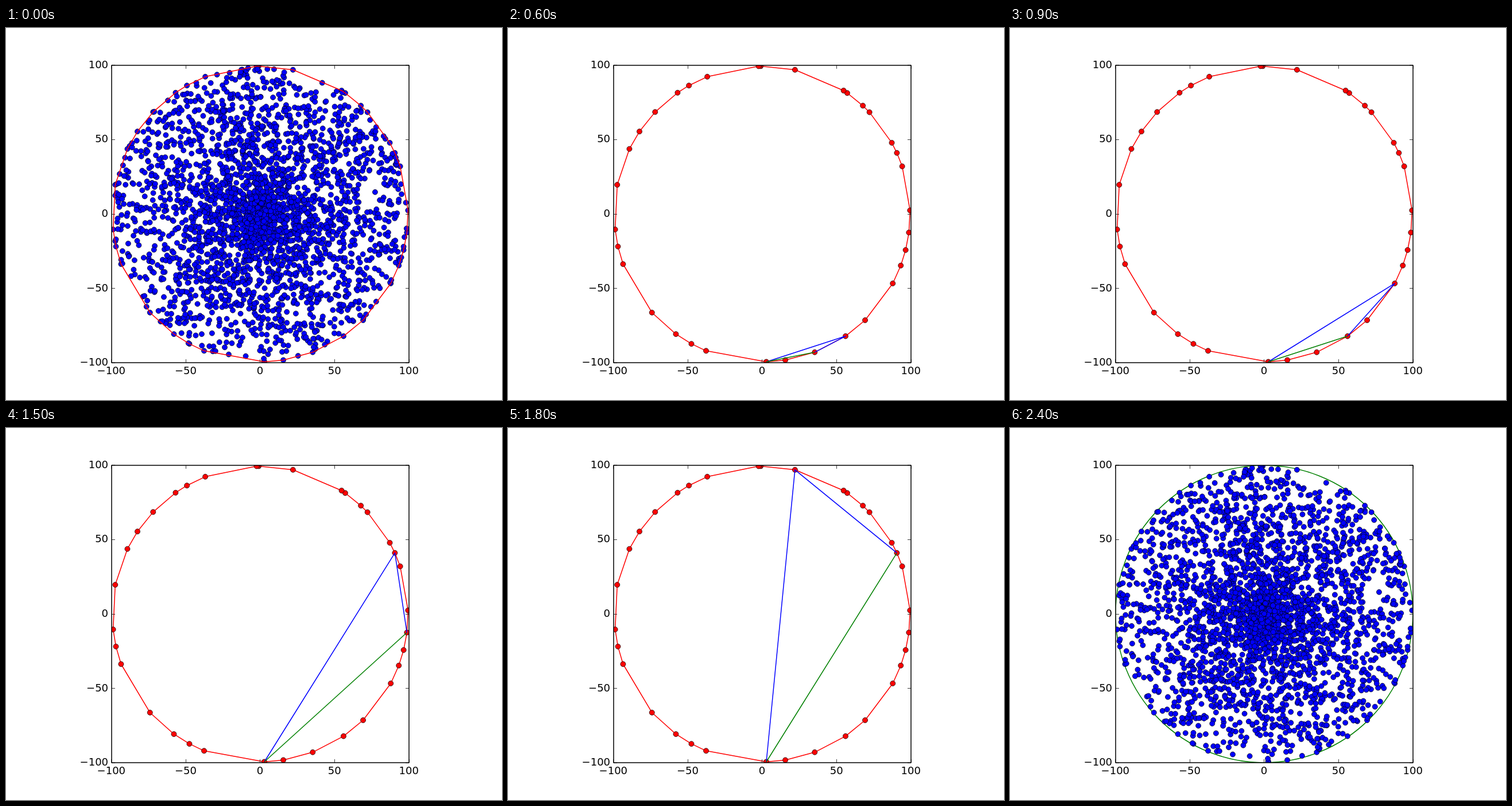
Recreate the animation shown at these times as an HTML page with a canvas. Size 864x648 px, loop 2700 ms.

```html
<!DOCTYPE html>
<html lang="en">
<head>
<meta charset="utf-8">
<title>Convex hull and enclosing circle</title>
<style>
html, body { margin: 0; width: 100%; height: 100%; overflow: hidden; background: #fff; }
canvas { display: block; }
</style>
</head>
<body>
<canvas id="stage" width="864" height="648"></canvas>
<script>
const W = 864, H = 648, STEP = 300, COUNT = 3000;
const CX = 442.8, CY = 324, R = 259.2;
const LEFT = Math.round(CX - R), RIGHT = Math.round(CX + R);
const TOP = Math.round(CY - R), BOTTOM = Math.round(CY + R);
const RED = '#f00', BLUE = '#00f', GREEN = '#008000';
const ctx = document.getElementById('stage').getContext('2d');

const polar = (deg, r) => {
  const a = deg * Math.PI / 180;
  return [CX + r * Math.cos(a), CY - r * Math.sin(a)];
};

// Hull vertices share one radius; directions in degrees, counterclockwise
const hull = [
  -88.4, -81, -69.2, -55.7, -45.9, -28, -20.4, -14.1, -7.2, 1.4, 18.8, 24.4,
  28.8, 43.5, 47.1, 54.9, 56.6, 77.2, 90.6, 91.4, 111.8, 119.7, 124.9, 136.4,
  146.1, 153.9, 168.6, 186, 192.7, 199.8, 221.8, 234.3, 241.4, 247.7
].map(deg => polar(deg, 257.6));

// Vertices joined to the lowest point, one more at each step
const stops = [1, 2, 3, 5, 8, 11, 17, 27];

function random(seed) {
  return () => {
    seed = seed + 0x6D2B79F5 | 0;
    let t = Math.imul(seed ^ seed >>> 15, seed | 1);
    t ^= t + Math.imul(t ^ t >>> 7, t | 61);
    return ((t ^ t >>> 14) >>> 0) / 4294967296;
  };
}

function insideHull([x, y]) {
  return hull.every(([ax, ay], i) => {
    const [bx, by] = hull[(i + 1) % hull.length];
    return (bx - ax) * (y - ay) <= (by - ay) * (x - ax);
  });
}

// Uniform radius, so the cloud thickens towards the centre
function scatter() {
  const rnd = random(41), points = [...hull];
  while (points.length < COUNT) {
    const p = polar(rnd() * 360, rnd() * R);
    if (insideHull(p)) points.push(p);
  }
  return points;
}

function dots(c, points, color) {
  c.fillStyle = color;
  c.strokeStyle = '#000';
  c.lineWidth = 0.75;
  for (const [x, y] of points) {
    c.beginPath();
    c.arc(x, y, 4.5, 0, 2 * Math.PI);
    c.fill();
    c.stroke();
  }
}

function line(points, color, width = 1.5) {
  ctx.strokeStyle = color;
  ctx.lineWidth = width;
  ctx.lineJoin = 'round';
  ctx.beginPath();
  points.forEach(([x, y]) => ctx.lineTo(x, y));
  ctx.stroke();
}

const cloud = document.createElement('canvas');
cloud.width = W;
cloud.height = H;
dots(cloud.getContext('2d'), scatter(), BLUE);

const outline = () => line([...hull, hull[0]], RED);

function triangle(step) {
  const a = hull[0], b = hull[stops[step - 1]], c = hull[stops[step]];
  line([b, c, a], BLUE);
  line([a, b], step > 1 ? GREEN : BLUE);
}

function circle() {
  ctx.strokeStyle = GREEN;
  ctx.lineWidth = 1.5;
  ctx.beginPath();
  ctx.arc(CX, CY, 259, 0, 2 * Math.PI);
  ctx.stroke();
}

// Aligns the inked part of the text: 0.5 centres it on x, 1 ends it at x
function label(text, x, baseline, align) {
  const m = ctx.measureText(text);
  const ink = m.actualBoundingBoxLeft + m.actualBoundingBoxRight;
  ctx.fillText(text, x - align * ink + m.actualBoundingBoxLeft, baseline);
}

function axes() {
  ctx.font = '18px "DejaVu Sans", sans-serif';
  ctx.fillStyle = '#000';
  for (let v = -100; v <= 100; v += 50) {
    const x = CX + v / 100 * R, y = CY - v / 100 * R;
    const px = Math.floor(x) + 0.5, py = Math.floor(y) + 0.5;
    const text = String(v).replace('-', '\u2212');
    for (const [edge, dir] of [[TOP, 6], [BOTTOM, -6]]) {
      line([[px, edge], [px, edge + dir]], '#000', 0.75);
    }
    for (const [edge, dir] of [[LEFT, 6], [RIGHT, -6]]) {
      line([[edge, py], [edge + dir, py]], '#000', 0.75);
    }
    label(text, x, 603, 0.5);
    label(text, 177.6, Math.round(y + 5), 1);
  }
  ctx.strokeStyle = '#000';
  ctx.lineWidth = 1.5;
  ctx.strokeRect(LEFT, TOP, RIGHT - LEFT, BOTTOM - TOP);
}

function draw(step) {
  ctx.fillStyle = '#fff';
  ctx.fillRect(0, 0, W, H);
  ctx.save();
  ctx.beginPath();
  ctx.rect(LEFT, TOP, RIGHT - LEFT, BOTTOM - TOP);
  ctx.clip();
  if (step === 0) {
    ctx.drawImage(cloud, 0, 0);
    outline();
  } else if (step < stops.length) {
    outline();
    dots(ctx, hull, RED);
    triangle(step);
  } else {
    circle();
    ctx.drawImage(cloud, 0, 0);
  }
  ctx.restore();
  axes();
}

const start = performance.now();
let shown = -1;

function tick() {
  const step = Math.floor((performance.now() - start) / STEP) % (stops.length + 1);
  if (step !== shown) draw(shown = step);
  requestAnimationFrame(tick);
}
tick();
</script>
</body>
</html>
```
